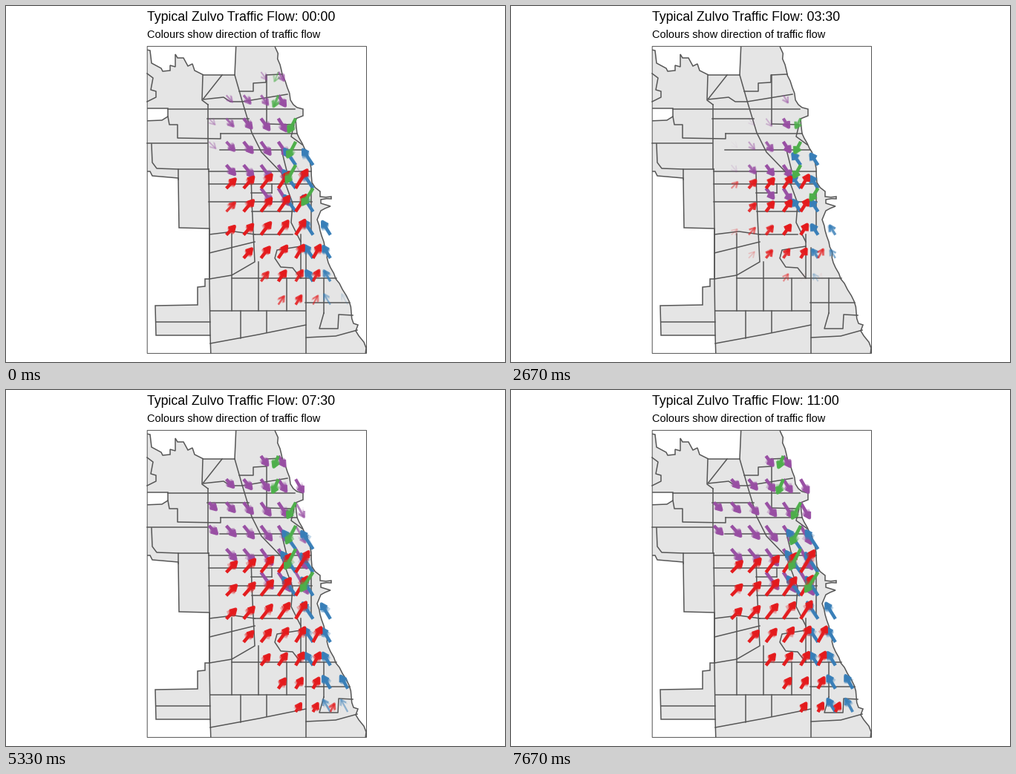
A matplotlib script that plays this animation: 672x480 px, repeating every 8000 ms.

```python
import math

import matplotlib.pyplot as plt
import numpy as np
from matplotlib.animation import FuncAnimation
from matplotlib.collections import LineCollection
from matplotlib.colors import to_rgb
from matplotlib.patches import Polygon, Rectangle

W, H, DPI = 672, 480, 96
LOOP_MS, TICK_MS, STEPS = 8000, 50, 24
PX = 72 / DPI
LAND, BORDER = "#e5e5e5", "#555555"
PURPLE, BLUE, RED, GREEN = (to_rgb(c) for c in ("#984ea3", "#377eb8", "#e41a1c", "#4daf4a"))

plt.rcParams["font.family"] = "Liberation Sans"
fig = plt.figure(figsize=(W / DPI, H / DPI), dpi=DPI, facecolor="white")
ax = fig.add_axes([0, 0, 1, 1])
ax.set(xlim=(0, W), ylim=(H, 0))
ax.axis("off")
panel = Rectangle((190.2, 54.4), 295.3, 414, fill=False, ec=BORDER, lw=PX, zorder=6, snap=False)
ax.add_patch(panel)
rng = np.random.default_rng(4)


# ---- map: key points of the coast, then the district borders ----------
def points(*xy):
    return np.array(xy, float).reshape(-1, 2)


def rough(pts, step=7, size=0.8):
    """Subdivide a path and shake the added points a little."""
    out = [pts[:1]]
    for a, b in zip(pts, pts[1:]):
        n = max(1, int(math.dist(a, b) / step))
        part = a + (b - a) * np.linspace(0, 1, n + 1)[1:, None]
        part[:-1] += rng.normal(0, size, (n - 1, 2))
        out.append(part)
    return np.vstack(out)


def border(*xy):
    x, y = points(*xy).T
    ax.plot(x, y, color=BORDER, lw=1.5 * PX, zorder=2, solid_joinstyle="round")


north = points(185, 58, 194, 60, 196, 77, 209, 84, 211, 88, 221, 87, 221, 80, 228, 82,
               228, 65, 231, 70, 239, 70, 245, 81, 251, 78, 254, 87, 266, 93, 308, 93, 310, 48)
coast = points(361, 48, 369, 79, 376, 101, 387, 133, 400, 139, 400, 148, 390, 152, 392, 172,
               402, 192, 411, 219, 412, 238, 423, 250, 423, 257, 438, 257, 438, 260, 424, 261,
               424, 266, 437, 270, 424, 276, 419, 288, 428, 318, 434, 346, 449, 374,
               462, 398, 468, 428, 474, 430, 471, 438, 485, 461, 485, 475)
west = points(276, 475, 275, 444, 202, 444, 201, 404, 258, 403, 258, 379, 268, 378, 268, 368,
              274, 368, 274, 300, 233, 299, 232, 232, 197, 229, 194, 223, 185, 223,
              185, 155, 210, 154, 218, 149, 218, 138, 185, 138)
land = Polygon(np.vstack([north, rough(coast), west]), fc=LAND, ec=BORDER, lw=1.5 * PX, zorder=1)
ax.add_patch(land)
land.set_clip_path(panel)

for y, left, right in ((139, 218, 389), (152, 271, 327), (172, 289, 392), (185, 190, 271),
                       (194, 288, 403), (220, 232, 273), (223, 273, 411), (240, 273, 412),
                       (252, 330, 358), (264, 273, 412), (277, 331, 388), (308, 335, 386),
                       (367, 304, 445), (400, 403, 463), (411, 275, 403), (426, 202, 275)):
    border(left, y, right, y)
for x, top, bottom in ((272, 133, 220), (304, 307, 411), (340, 345, 411), (378, 367, 411),
                       (404, 326, 468), (316, 411, 448), (351, 93, 160), (358, 240, 252),
                       (411, 240, 305), (428, 367, 414), (351, 411, 440), (397, 308, 367)):
    border(x, top, x, bottom)
border(190, 91, 198, 97, 195, 113, 202, 115, 202, 123, 190, 129)
border(218, 149, 220, 160, 231, 160, 231, 178, 289, 179, 289, 172)
border(196, 186, 197, 211, 203, 219, 232, 220, 232, 234)
border(265, 93, 264, 127, 272, 133)
border(291, 93, 265, 126, 293, 123, 302, 129, 318, 129, 379, 119)
border(308, 93, 318, 128, 331, 171, 344, 197, 371, 225, 386, 266, 384, 292, 397, 318)
border(314, 115, 333, 115, 333, 104, 350, 103, 350, 93, 372, 92)
border(351, 159, 388, 160, 384, 176, 399, 187)
border(371, 194, 378, 222)
border(273, 220, 274, 300, 274, 368, 275, 444)
border(330, 224, 331, 264, 335, 345, 304, 363, 274, 368)
border(274, 308, 307, 304, 335, 308)
border(274, 333, 335, 318)
border(397, 324, 365, 329, 362, 340, 370, 352, 386, 353, 397, 367)
border(275, 455, 340, 443, 404, 430)
border(428, 414, 422, 435, 447, 435, 448, 416, 467, 417)
border(404, 447, 444, 445, 473, 437)

title = ax.text(190, 20, "", size=13.3, va="baseline")
ax.text(190, 43, "Colours show direction of traffic flow", size=10.85, va="baseline")

# ---- flows: every arrow points towards a busy hub ----------------------
HUB = (6, 5)
KEYS = (0, 5, 8, 12, 16, 20, 23)
SPREAD = (5.8, 4.9, 4.2, 6.1, 7.4, 8, 8)      # how far from the hub traffic runs, in cells
STRETCH = (0.85, 0.75, 0.6, 0.85, 0.96, 1, 1)  # arrow length over the day
# x and y direction, angle at the hub column, change of angle per column
HEADING = {PURPLE: (1, 1, 60, 3), BLUE: (-1, -1, 55, 2), RED: (1, -1, 58, 3), GREEN: (-1, 1, 62, -5)}


def columns(color, row):
    """Grid columns in which a direction occurs."""
    shore = int(5.65 + 0.35 * row)
    if color == PURPLE and row <= 5:
        return range(int(1 + 1.2 * abs(row - 2.5)), 7 if row else 6)
    if color == BLUE and row >= 4:
        return range(shore - 1, shore + 1)
    if color == RED and row >= 5:
        return range(max(2, row - 5), int(5.3 + 0.34 * row))
    if color == GREEN and row <= 5:
        return (int(5.5 + 0.3 * row),)
    return ()


def make_flow(color, col, row):
    sx, sy, angle, turn = HEADING[color]
    angle = math.radians(angle + turn * (col - HUB[0]))
    away = math.dist((col, row), HUB)
    length = max(34 - 3.4 * away, 20 if color == BLUE else 13)
    need = max(away, 6) if color == PURPLE and col == HUB[0] else away
    return dict(color=color, x=250 + 23.35 * col, y=89 + 31.36 * row,
                dx=sx * length * math.cos(angle), dy=sy * length * math.sin(angle),
                need=need + rng.normal(0, 0.3), phase=rng.uniform(0, math.tau))


flows = [make_flow(color, col, row) for color in HEADING
         for row in range(12) for col in columns(color, row)]


def arrow(x, y, dx, dy):
    tip = (x + dx, y + dy)
    back = math.atan2(-dy, -dx)
    left, right = ((tip[0] + 8.5 * math.cos(back + a), tip[1] + 8.5 * math.sin(back + a))
                   for a in (-math.pi / 6, math.pi / 6))
    return [[(x, y), tip], [left, tip, right]]


WAKE = ((2, 0.3), (1, 0.5), (0, 0.95))  # steps back in time, opacity
arrows = LineCollection([], capstyle="butt", joinstyle="round", zorder=4)
ax.add_collection(arrows, autolim=False)


def draw(tick):
    step = int((tick * TICK_MS + 35) * STEPS / LOOP_MS)
    segments, colors, widths = [], [], []
    for f in flows:
        for lag, opacity in WAKE:
            t = max(step - lag, 0)
            strength = min(1, (np.interp(t, KEYS, SPREAD) - f["need"]) / 1.6)
            if strength < 0.08:
                continue
            sway = 0.05 * lag * math.sin(f["phase"] + 2 * t)
            reach = np.interp(t, KEYS, STRETCH) * (1 - 0.08 * lag)
            segments += arrow(f["x"], f["y"], reach * (f["dx"] - sway * f["dy"]),
                              reach * (f["dy"] + sway * f["dx"]))
            colors += [(*f["color"], opacity * strength)] * 2
            widths += [(0.8 + 3.4 * strength) * PX] * 2
    arrows.set_segments(segments)
    arrows.set_color(colors)
    arrows.set_linewidth(widths)
    half_hours = max(step - 1, 0)
    title.set_text(f"Typical Zulvo Traffic Flow: {half_hours // 2:02d}:{half_hours % 2 * 30:02d}")
    return arrows, title


anim = FuncAnimation(fig, draw, frames=LOOP_MS // TICK_MS, interval=TICK_MS,
                     repeat=True, repeat_delay=0, blit=False)
plt.show()
```
